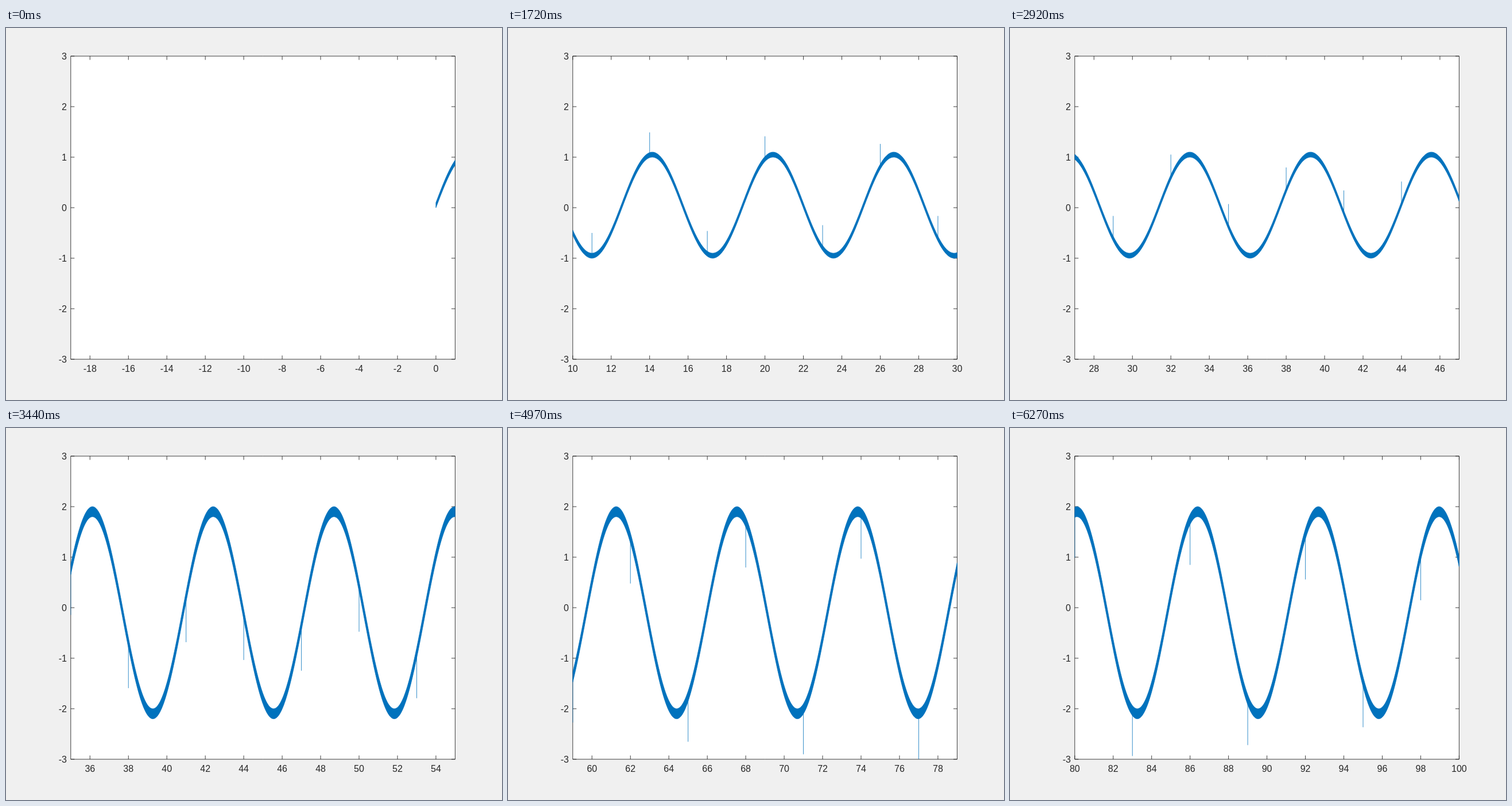
Recreate the animation shown at these times as an HTML page with a canvas. Size 864 by 648 pixels, loop 6330 ms.

```html
<!DOCTYPE html>
<html lang="en">
<head>
<meta charset="utf-8">
<title>Scrolling signal</title>
<style>
  html, body { margin: 0; width: 100%; height: 100%; overflow: hidden; background: #f0f0f0; }
  canvas { display: block; width: 864px; height: 648px; }
</style>
</head>
<body>
<canvas id="c" width="864" height="648"></canvas>
<script>
const ctx = document.getElementById('c').getContext('2d');
const LOOP = 6330;
const LEFT = 112.8, RIGHT = 782.4, TOP = 49, BOTTOM = 577;
const WIDTH = RIGHT - LEFT, HEIGHT = BOTTOM - TOP;
const SPAN = 20, UNIT_X = WIDTH / SPAN, UNIT_Y = HEIGHT / 6;
const TICK = 6.5, INK = '#262626', BLUE = '#0072bd', PAPER = '#f0f0f0';
const FLIP_AT = 50;   // past this the signal is scaled by -2
const RESUME = 2590;  // end of the one short hold

// Right end of the x axis: one unit per step, slightly slower after the hold
function endAt(t) {
  return Math.floor(t < RESUME
    ? Math.min(41, 1 + t / 59.2)
    : Math.min(100, 42 + (t - RESUME) / 63.4));
}

const py = y => TOP + (3 - y) * UNIT_Y;

function line(x0, y0, x1, y1) {
  ctx.moveTo(x0, y0);
  ctx.lineTo(x1, y1);
}

function label(value, x, y, align) {
  ctx.textAlign = align;
  ctx.fillText(String(value), x, y);
}

function drawAxes(start) {
  ctx.fillStyle = '#fff';
  ctx.fillRect(LEFT, TOP, WIDTH, HEIGHT);
  ctx.strokeStyle = ctx.fillStyle = INK;
  ctx.lineWidth = 0.9;
  ctx.font = '16px "Liberation Sans", Arial, sans-serif';
  ctx.beginPath();
  ctx.rect(LEFT, TOP, WIDTH, HEIGHT);

  for (let v = Math.ceil(start / 2) * 2; v <= start + SPAN; v += 2) {
    const x = LEFT + (v - start) * UNIT_X;
    line(x, BOTTOM, x, BOTTOM - TICK);
    line(x, TOP, x, TOP + TICK);
    label(v, x, 599, 'center');
  }
  for (let v = -3; v <= 3; v++) {
    const y = py(v);
    line(LEFT, y, LEFT + TICK, y);
    line(RIGHT, y, RIGHT - TICK, y);
    label(v, 106, y + 5.8, 'right');
  }
  ctx.stroke();
}

function drawSignal(start, end, gain) {
  const from = Math.max(0, start);
  const steps = (end - from) * 40;
  const px = x => LEFT + (x - start) * UNIT_X;
  const value = (x, lift) => py(gain * (Math.sin(x) + lift));
  const edge = (i, lift) => {
    const x = from + i / 40;
    ctx.lineTo(px(x), value(x, lift));
  };

  ctx.save();
  ctx.beginPath();
  ctx.rect(LEFT - 0.4, TOP, WIDTH + 0.8, HEIGHT);
  ctx.clip();
  ctx.fillStyle = ctx.strokeStyle = BLUE;
  ctx.lineWidth = 0.8;

  // dense noise fills the band between the sine and the sine + 0.1
  ctx.beginPath();
  for (let i = 0; i <= steps; i++) edge(i, 0.1);
  for (let i = steps; i >= 0; i--) edge(i, 0);
  ctx.closePath();
  ctx.fill();
  ctx.stroke();

  // a spike every third unit
  ctx.beginPath();
  for (let x = 2; x < end; x += 3) {
    if (x >= start) line(px(x), value(x, 0.05), px(x), value(x, 0.5));
  }
  ctx.stroke();
  ctx.restore();
}

function draw(t) {
  const end = endAt(t), start = end - SPAN;
  ctx.fillStyle = PAPER;
  ctx.fillRect(0, 0, 864, 648);
  drawAxes(start);
  drawSignal(start, end, end > FLIP_AT ? -2 : 1);
}

let origin = null;
function tick(now) {
  if (origin === null) origin = now;
  draw((now - origin) % LOOP);
  requestAnimationFrame(tick);
}
draw(0);
requestAnimationFrame(tick);
</script>
</body>
</html>
```
